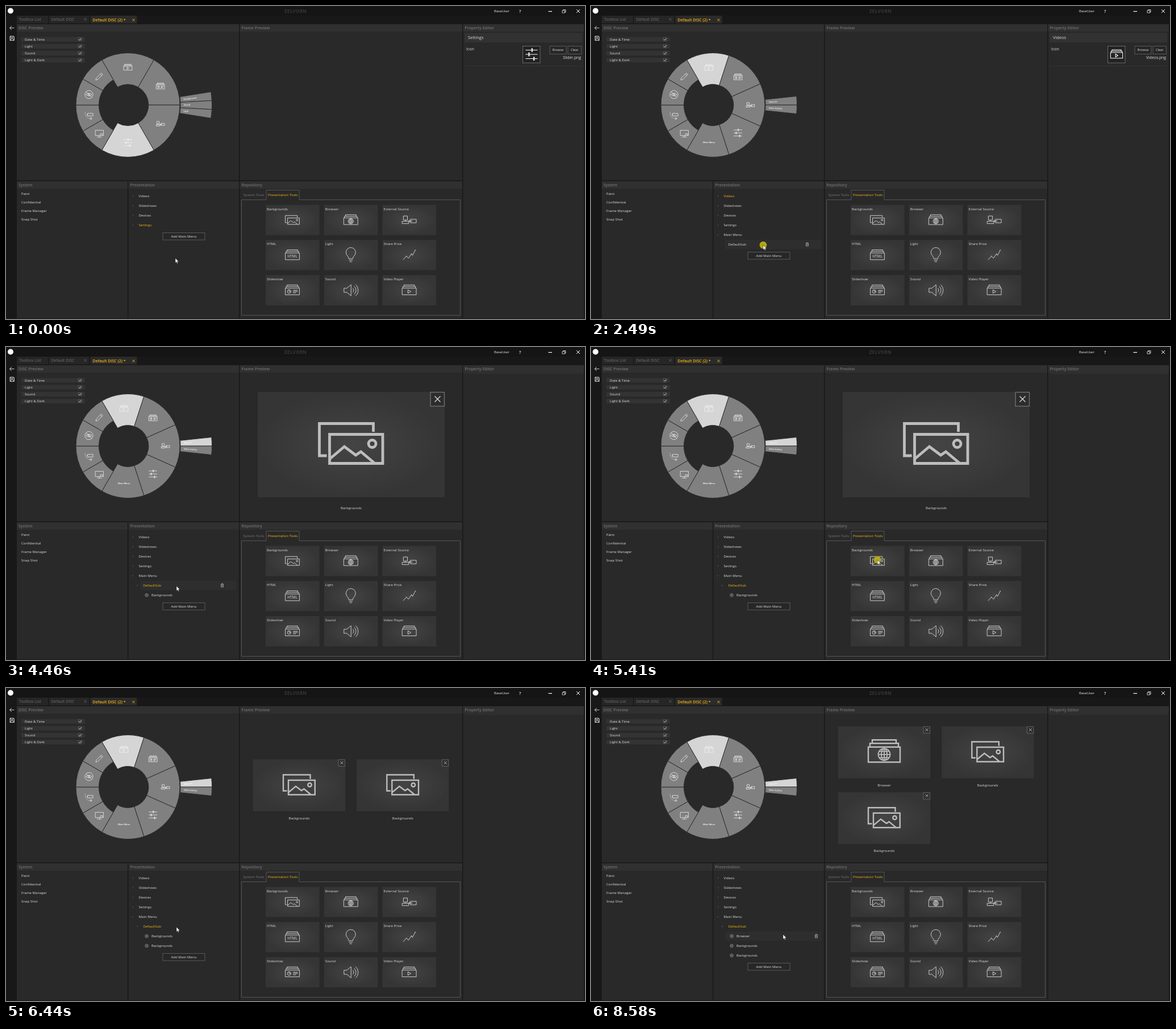
Write an HTML page that moves like this. It is 1019 px wide and 550 px high and loops after 9770 ms.

```html
<!DOCTYPE html>
<html lang="en">
<head>
<meta charset="utf-8">
<title>Menu editor</title>
<style>
html, body { margin: 0; width: 100%; height: 100%; overflow: hidden; background: #181818; }
svg { display: block; width: 100vw; height: 100vh; }
text { font-family: "Open Sans", "Noto Sans", sans-serif; white-space: pre; }
</style>
</head>
<body>
<svg id="stage" viewBox="0 0 1019 550">
  <defs>
    <radialGradient id="card"><stop offset="0" stop-color="#444"/><stop offset="1" stop-color="#353535"/></radialGradient>
  </defs>
  <g id="base"></g>
  <g id="scene"></g>
  <g id="pointer"></g>
</svg>
<script>
const LOOP = 9770;
const GOLD = '#f4b70f', LIGHT = '#dedede', DIM = '#717171';
const $ = id => document.getElementById(id);

// ---------- drawing helpers ----------
const box = (x, y, w, h, fill, stroke = 'none', sw = 1) =>
  `<rect x="${x}" y="${y}" width="${w}" height="${h}" fill="${fill}" stroke="${stroke}" stroke-width="${sw}"/>`;
const line = (d, stroke = LIGHT, sw = 1) =>
  `<path d="${d}" fill="none" stroke="${stroke}" stroke-width="${sw}"/>`;
const label = (x, y, s, fill = LIGHT, size = 6.1, extra = '') =>
  `<text x="${x}" y="${y + size * 0.35}" fill="${fill}" font-size="${size}" ${extra}>${s}</text>`;
const mid = 'text-anchor="middle"', end = 'text-anchor="end"', semi = 'font-weight="600"';
const cross = (x, y, r, color, sw) =>
  line(`M${x - r} ${y - r}l${2 * r} ${2 * r}m0 ${-2 * r}l${-2 * r} ${2 * r}`, color, sw);

// ---------- icons, about 116 units wide around 0,0 ----------
const p = d => `<path d="${d}"/>`;
const ring = (x, y, r) => `<circle cx="${x}" cy="${y}" r="${r}"/>`;
const stack = p('M-56-17H56V36H-56ZM-50-17V-30H50V-17M-42-30V-42H42V-30');
const ICONS = {
  backgrounds: p('M-43 21H-56V-35.5H39V-21M-38-16.5H55.5V34.5H-38ZM-37 26L-12 5 8 20 17 14 41 34') + ring(37, 0, 6.5),
  browser: stack + `<g stroke-width="3.5">${ring(0, 9, 21)}<ellipse cy="9" rx="10" ry="21"/>${p('M0-12V30M-21 9H21M-18-2H18M-18 20H18')}</g>`,
  videos: stack + p('M-10-4L13 10-10 24Z'),
  slideshow: stack + ring(-26, 10, 14) + p('M-26-4V10H-12M6 0H42M6 10H42M6 20H28'),
  html: stack + '<text y="20" font-size="29" fill="currentColor" stroke="none" text-anchor="middle">HTML</text>',
  external: p('M-46-32H-14V0H-46ZM-30 0V10M-56 10H-4V28H-56ZM10-6H56V22H10ZM26 8H-4M6 0L-4 8 6 16'),
  light: p('M-16 28C-16 8-38 2-38-22A38 38 0 0 1 38-22C38 2 16 8 16 28ZM-15 40H15M-9 52H9'),
  share: p('M-48 36L-22 8-6 24 18-10 26 2 48-40') + ring(-22, 8, 1.5) + ring(18, -10, 1.5) + ring(48, -40, 1.5),
  sound: p('M-54-16H-32L2-44V44L-32 16H-54ZM16-16A22 22 0 0 1 16 16M27-31A40 40 0 0 1 27 31M38-45A60 60 0 0 1 38 45'),
  settings: p('M-56-40H56M-56 0H56M-56 40H56M0-54H8V-26H0ZM-28-14H-20V14H-28ZM18 26H26V54H18Z'),
  pencil: p('M-48 48L-40 20 26-46 46-26-20 40ZM12-32L32-12'),
  hidden: ring(0, 0, 54) + p('M-40 0Q0-36 40 0Q0 36-40 0ZM-38-38L38 38') + ring(0, 0, 12),
  frames: p('M-18-28H54V6H-18ZM-18-11H-32M-50-46V-34M-48-22V-10M-43 2L-37 14M-27 25L-17 33M-4 38H8M18 32H36V50H18Z'),
  screen: p('M-54-44H54V26H-54ZM0 26V46M-30 46H30M14 2H42V26M14 2V26')
};
const icon = (name, x, y, scale, color = '#d4d4d4', sw = 4.2) =>
  `<g transform="translate(${x} ${y}) scale(${scale})" fill="none" stroke="${color}" color="${color}" stroke-width="${sw}">${ICONS[name]}</g>`;

// ---------- disc ----------
const CX = 214.5, CY = 174;
const polar = (r, a) => {
  const t = a * Math.PI / 180;
  return [+(CX + r * Math.cos(t)).toFixed(2), +(CY + r * Math.sin(t)).toFixed(2)];
};
function slice(r0, r1, a0, a1, on) {
  const d = `M${polar(r0, a0)}L${polar(r1, a0)}A${r1} ${r1} 0 0 1 ${polar(r1, a1)}L${polar(r0, a1)}A${r0} ${r0} 0 0 0 ${polar(r0, a0)}Z`;
  return `<path d="${d}" fill="${on ? '#d5d5d5' : '#808080'}" stroke="#292929" stroke-width=".9"/>`;
}
function disc(items, chosen, subs, chosenSub) {
  let out = '';
  const step = 240 / items.length;
  items.forEach((name, i) => {
    const a = -120 + i * step, [x, y] = polar(66, a + step / 2);
    out += slice(36.3, 91.5, a, a + step, i === chosen);
    out += ICONS[name] ? icon(name, x, y, 0.132, '#f4f4f4', 5.6)
      : label(x, y, name, '#fff', 3.9, mid + ' ' + semi);
  });
  ['screen', 'frames', 'hidden', 'pencil'].forEach((name, i) => {
    const a = 120 + i * 30, [x, y] = polar(71, a + 15);
    out += slice(51, 91.5, a, a + 30) + icon(name, x, y, 0.132, '#f4f4f4', 5.6);
  });
  subs.forEach((name, i) => {
    const a = (i - subs.length / 2) * 6;
    out += slice(92.5, 148, a, a + 6, i === chosenSub);
    out += `<g transform="rotate(${a + 3} ${CX} ${CY})">${label(CX + 98.5, CY, name, '#fff', 3.7, semi)}</g>`;
  });
  return out;
}

// ---------- fixed interface ----------
function panel(x, y, w, h, title) {
  return box(x, y, w, h, '#292929') + box(x, y, w, 13, '#303030') + label(x + 3, y + 7, title, DIM, 7, semi);
}
function tab(x, w, title, active) {
  return box(x, 17, w, 13.5, active ? '#2b2b2b' : '#262626') +
    label(x + 4, active ? 24.6 : 23.6, title, active ? GOLD : DIM, 7, active ? semi : '');
}
function base() {
  let out = box(0, 0, 1019, 550, '#181818') + box(0, 0, 1019, 17, '#151515');
  out += '<circle cx="8" cy="8.5" r="5" fill="#fff"/>';
  out += label(509.5, 9, 'ZELVORN', '#373737', 8, `${mid} font-weight="700" letter-spacing=".4"`);
  out += label(859, 9, 'BaseUser', '#eee', 6.1) + label(903, 9, '?', '#eee', 7.5, semi);
  out += line('M954.5 9.5h6.5', '#fff', 1.2) + line('M979 8h4.5v4h-4.5zM980.5 8V6.5h4.5V11h-1.5', '#eee', 0.8);
  out += cross(1007, 9, 3, '#fff', 1);
  out += tab(19, 55, 'Toolbox List') + tab(75.5, 71, 'Default DISC') + tab(148.5, 82, 'Default DISC (2) *', true);
  out += cross(139.5, 23.5, 2, DIM, 0.8) + cross(224.5, 24.5, 2, GOLD, 1);
  out += line('M14.5 38.5H6.5M10 35L6.5 38.5 10 42', '#ddd', 0.9);
  out += line('M7 53H13.5L14.5 54V60.5H7ZM8.5 53V55.5H12.5V53M8.5 60.5V57.5H13V60.5', '#ddd', 0.9);

  out += panel(19, 32, 391, 274.5, 'DISC Preview') + panel(411.5, 32, 391.5, 274.5, 'Frame Preview');
  out += panel(804.5, 32, 212.5, 517, 'Property Editor') + panel(19, 308, 195, 241, 'System');
  out += panel(215.5, 308, 194.5, 241, 'Presentation') + panel(411.5, 308, 391.5, 241, 'Repository');

  ['Date &amp; Time', 'Light', 'Sound', 'Light &amp; Dark'].forEach((s, i) => {
    const y = 58.5 + i * 12.2;
    out += box(27, y - 4, 112, 8, '#333') + label(33, y, s);
    out += box(127.5, y - 2.8, 5.6, 5.6, 'none', '#686868', 0.6) + line(`M128.4 ${y}l1.5 1.6 2.8-3.2`, '#fff', 0.8);
  });
  ['Paint', 'Confidential', 'Frame Manager', 'Snap Shot'].forEach((s, i) => out += label(27, 330 + i * 14.9, s));

  out += line('M414.5 340.5H458V323.5H516V340.5H799.5V543.5H414.5Z', '#616161', 0.8);
  out += label(417.5, 331.5, 'System Tools', '#777') + label(461, 332, 'Presentation Tools', GOLD);
  const tools = [['Backgrounds', 'backgrounds'], ['Browser', 'browser'], ['External Source', 'external'],
    ['HTML', 'html'], ['Light', 'light'], ['Share Price', 'share'],
    ['Slideshow', 'slideshow'], ['Sound', 'sound'], ['Video Player', 'videos']];
  tools.forEach(([s, name], i) => {
    const x = 457 + (i % 3) * 102.8, y = 349.5 + Math.floor(i / 3) * 61.7;
    out += box(x, y, 94.5, 53, 'url(#card)') + label(x + 2, y + 7, s) + icon(name, x + 47, y + 26.6, 0.222);
  });
  return out;
}

// ---------- changing interface ----------
const button = (x, y, w, h, s, size) =>
  box(x, y, w, h, '#272727', '#646464', 0.8) + label(x + w / 2, y + h / 2, s, LIGHT, size, mid);
function property(name, file) {
  if (!name) return line('M807 46.5H1015', '#353535', 1);
  return box(807, 47.5, 207, 16.5, '#323232') + label(813, 55.5, name, LIGHT, 7.4) +
    label(810, 75.5, 'Icon', LIGHT, 7) + box(909.5, 70.5, 30.5, 29.5, '#222', '#7a7a7a', 0.8) +
    icon(name.toLowerCase(), 925, 85, 0.19, '#fff', 5.5) +
    button(957, 70.5, 29, 14, 'Browse', 5.7) + button(989, 70.5, 23.5, 14, 'Clear', 5.7) +
    label(1012, 90.5, file, LIGHT, 6.8, end) + line('M807 105.5H1014', '#343434', 1);
}
function preview(names) {
  const n = names.length, one = n === 1;
  const w = one ? 329 : 162, h = one ? 185 : 91, b = one ? 25 : 12;
  return names.map((s, i) => {
    const x = one ? 443 : 435 + (i % 2) * 182.3;
    const y = one ? 79 : n === 2 ? 125.5 : 67.5 + Math.floor(i / 2) * 115.7;
    const bx = x + w - b, k = one ? 1 : 0.5;
    return box(x, y, w, h, 'url(#card)') + icon(s.toLowerCase(), x + w / 2, y + h / 2 - 1.5 * k, k, '#bdbdbd', 4.8) +
      box(bx, y + 0.5, b - 0.5, b - 0.5, '#2d2d2d', '#707070', one ? 1.4 : 0.8) +
      cross(bx + b / 2, y + b / 2, one ? 5 : 2.5, '#d4d4d4', one ? 1.4 : 0.8) +
      label(x + w / 2, y + h + (one ? 18.5 : 12), s, LIGHT, 6.1, mid);
  }).join('');
}
const rowY = i => 334 + i * 17;
const trash = (x, y) => line(`M${x - 2.7} ${y - 2}h5.4M${x - 1} ${y - 2}v-1.2h2v1.2M${x - 2} ${y - 2}v5h4v-5M${x - 0.6} ${y - 0.8}v2.6M${x + 0.6} ${y - 0.8}v2.6`, '#b8b8b8', 0.7);
const chevron = (x, y, open) =>
  line(open ? `M${x - 1.5} ${y - 0.5}l1.5 1.3 1.5-1.3` : `M${x} ${y - 1.5}l1.3 1.5-1.3 1.5`, '#5c5c5c', 0.8);

function tree(state, children, hover) {
  const rows = ['Videos', 'Slideshows', 'Devices', 'Settings'].map(s => [s, 0]);
  if (state) rows.push(['Main Menu', 0], ['DefaultSub', 1], ...children.map(s => [s, 2]));
  const chosen = state === 0 ? 3 : state === 1 ? 0 : 5;
  let out = '';
  rows.forEach(([s, depth], i) => {
    const y = rowY(i);
    if (i === hover) {
      const x = depth ? 236 : 228;
      out += box(x, y - 8, 405.5 - x, 16, '#2e2e2e') + trash(depth === 1 ? 380.5 : 396.5, y);
    }
    if (!depth) out += chevron(223, y, i === 4);
    if (depth === 1 && children.length) out += chevron(231, y, true);
    if (depth === 2) out += line(`M244.8 ${y}a2.8 2.8 0 1 0 5.6 0a2.8 2.8 0 1 0-5.6 0M246.3 ${y}a1.3 1.3 0 1 0 2.6 0a1.3 1.3 0 1 0-2.6 0`, '#a0a0a0', 0.7);
    out += label([233.5, 241.5, 256][depth], y, s, i === chosen ? GOLD : LIGHT);
  });
  return out + button(276, rowY(rows.length) - 3.5, 74, 12.5, 'Add Main Menu', 6.1);
}

function scene(state, hover, target) {
  const B = 'Backgrounds';
  const children = [[], [], [], [B], [B, B], ['Browser', B, B]][state];
  const main = ['videos', 'slideshow', 'external', 'settings'];
  let out = state === 0
    ? disc(main, 3, [B, 'Sound', 'Light'])
    : disc([...main, 'Main Menu'], 0, ['Video 01', 'Video Gallery'], state > 1 ? 0 : -1);
  out += property(...([['Settings', 'Slider.png'], ['Videos', 'Videos.png']][state] || []));
  out += preview(children) + tree(state, children, hover);
  if (target && state < 4) out += `<rect x="228.5" y="410.5" width="177" height="${state === 2 ? 17 : 33.5}" rx="1.5" fill="none" stroke="#8c8c8c" stroke-width=".9"/>`;
  if (target && state === 4) out += line('M237 427.5H405M237 425.5v4M405 425.5v4', '#a8a8a8', 1);
  return out;
}

// ---------- timeline ----------
// start, end, steps, then [step, x, y] keys
const MOVES = [
  [590, 1080, 8, [0, 298, 443], [8, 303, 404]],
  [2090, 2290, 4, [0, 303, 404], [4, 303, 420]],
  [2950, 3860, 13, [0, 303, 420], [8, 476, 384], [9, 471, 386], [10, 459, 391], [13, 392, 416]],
  [3930, 4130, 4, [0, 392, 416], [4, 300, 420]],
  [4860, 5820, 14, [0, 300, 420], [8, 504, 374], [9, 497, 376], [14, 307, 421]],
  [5900, 6120, 4, [0, 307, 421], [4, 300, 420]],
  [6970, 7880, 14, [0, 300, 420], [8, 597, 379], [9, 590, 381], [14, 412, 421]],
  [7950, 8250, 5, [0, 412, 421], [2, 361, 431], [5, 338, 433]]
];
const PRESSES = [[1300, 1560], [2490, 2620], [3490, 4460], [5370, 6440], [7480, 8510]];
const CHANGES = [1430, 2560, 4460, 6440, 8510];

function position(t) {
  const move = MOVES.filter(m => t >= m[0]).pop();
  if (!move) return MOVES[0][3].slice(1);
  const [t0, t1, n, ...keys] = move;
  const k = Math.min(n, Math.floor((t - t0) / (t1 - t0) * (n - 1) + 1e-6) + 1);
  const i = keys.findIndex(key => key[0] >= k), a = keys[i - 1], b = keys[i];
  let u = (k - a[0]) / (b[0] - a[0]);
  if (b[0] - a[0] > 3) u = u * u * (3 - 2 * u);
  return [a[1] + (b[1] - a[1]) * u, a[2] + (b[2] - a[2]) * u];
}

function pointer(pressed, dragging, inTree) {
  let out = pressed ? '<circle r="6.3" fill="#b8ac12" opacity=".96"/>' : '';
  if (dragging && !inTree) {
    return out + '<circle r="4.6" fill="none" stroke="#38350c" stroke-width=".9"/><circle r="2.6" fill="none" stroke="#38350c" stroke-width=".7"/>' + line('M-3.2-3.2L3.2 3.2', '#38350c', 0.9);
  }
  out += '<path d="M0 0V8.4L1.9 6.7 3.2 9.6 4.6 9 3.3 6.2H6Z" fill="#fff" stroke="#111" stroke-width=".5"/>';
  if (dragging) out += box(4.8, 9.3, 5.6, 5.6, '#fff', '#111', 0.5) + line('M7.6 10.5v3.2M6 12.1h3.2', '#111', 0.9);
  return out;
}

let shown = '';
function draw(t) {
  const [x, y] = position(t);
  const state = CHANGES.filter(c => t >= c).length;
  const press = PRESSES.find(([a, b]) => t >= a && t < b);
  const dragging = !!press && press[0] > 3000 && t >= press[0] + 80;
  const inTree = x < 406;
  const settling = [6440, 8510].some(c => t >= c && t < c + 70);
  const hover = inTree && !dragging && !settling ? Math.floor((y - 325.5) / 17) : -1;
  const target = dragging && x < 390;

  const key = [state, hover, target].join();
  if (key !== shown) {
    shown = key;
    $('scene').innerHTML = scene(state, hover, target);
  }
  $('pointer').innerHTML = pointer(!!press, dragging, inTree);
  $('pointer').setAttribute('transform', `translate(${x.toFixed(2)} ${y.toFixed(2)})`);
}

$('base').innerHTML = base();
const start = performance.now();
function tick() {
  draw((performance.now() - start) % LOOP);
  requestAnimationFrame(tick);
}
tick();
</script>
</body>
</html>
```
